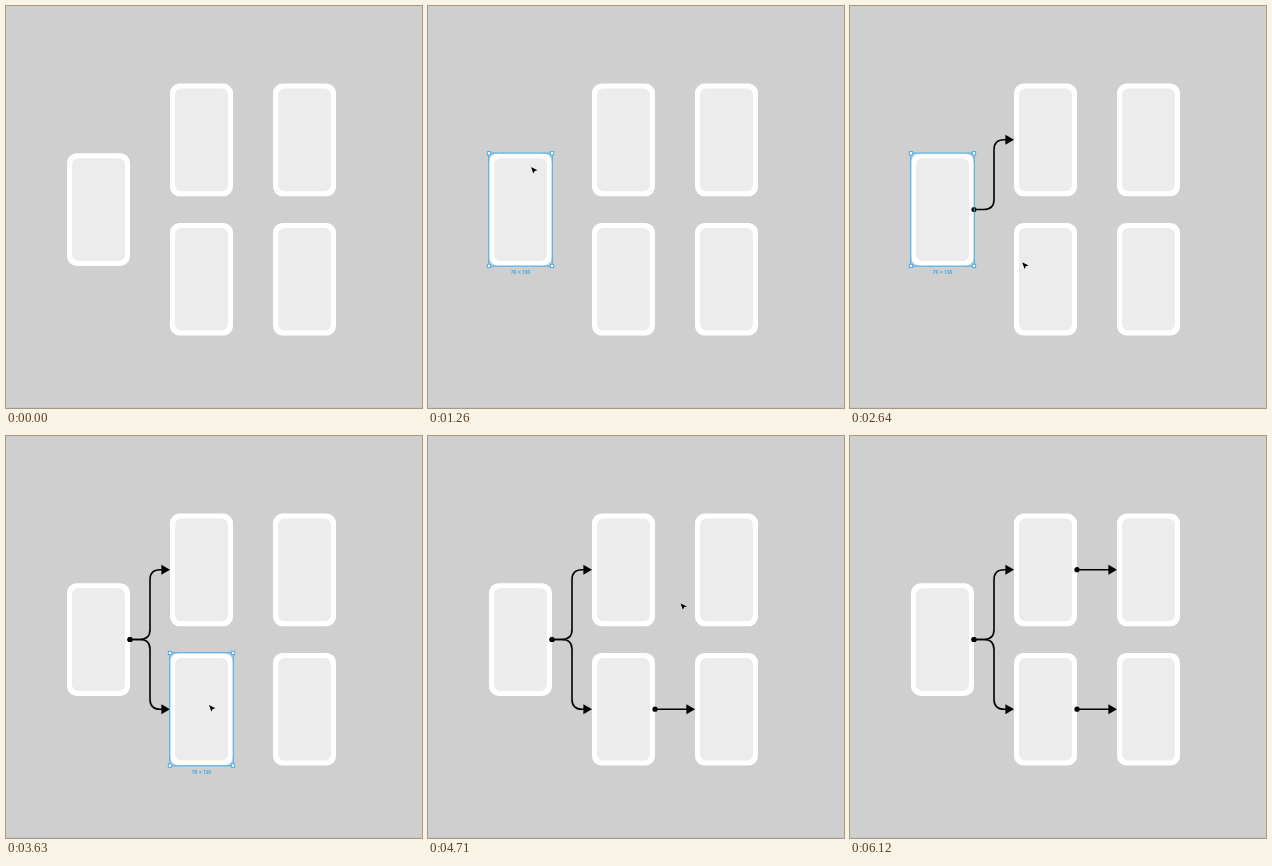
Recreate the animation shown at these times as an HTML page. Size 416 by 402 pixels, loop 7.17 s.

```html
<!DOCTYPE html>
<html lang="en">
<head>
<meta charset="utf-8">
<title>Flow arrows</title>
<style>
  html, body { margin: 0; width: 100%; height: 100%; overflow: hidden; background: #cfcfcf; }
  svg { display: block; width: 416px; height: 402px; }
  .link path { fill: none; stroke: #000; stroke-width: 1.6; }
  .hover { fill: none; stroke: #2b9fe8; stroke-width: 1.4; }
  .select rect { fill: none; stroke: #3aa8ee; stroke-width: 1; }
  .select .handle { fill: #fff; stroke-width: .9; }
  .select text { font: 500 4.8px Inter, Arial, sans-serif; fill: #1c9be6; text-anchor: middle; }
</style>
</head>
<body>
<svg viewBox="0 0 416 402">
  <rect width="416" height="402" fill="#cfcfcf"/>
  <rect y="401" width="416" height="1" fill="#c6c6c6"/>
  <g id="cards"></g>
  <g id="links"></g>
  <g id="marks"></g>
  <path id="cursor" d="M0 0L6.6 3.2L3.7 4L2.4 6.8Z" fill="#000" stroke="#fff" stroke-width=".8" paint-order="stroke"/>
</svg>
<script>
const LOOP = 7170, STEP = 30, W = 63, H = 112.6;
const $ = id => document.getElementById(id);

const cards = {
  start: [61, 147.3],
  top: [164, 77.6],
  topRight: [267, 77.6],
  bottom: [164, 217],
  bottomRight: [267, 217]
};

// Time spans in ms during which each card is outlined or selected
const hovers = {
  start: [[630, 1020], [1980, 2130]],
  top: [[390, 510], [1410, 1620], [4830, 5010]],
  topRight: [[5310, 5730], [6000, 6060]],
  bottom: [[2670, 2910], [3390, 3630]],
  bottomRight: [[4050, 4320], [4620, 4650]]
};
const selections = {
  start: [[1020, 1620], [2130, 2910]],
  top: [[5010, 5730]],
  bottom: [[3630, 4320]]
};

// Cursor moves: start, end, x, y
const origin = [313, 208];
const moves = [
  [240, 810, 103, 161],
  [1260, 1530, 181, 134],
  [1860, 2070, 105, 190],
  [2370, 2790, 182, 266],
  [3360, 3510, 203, 269],
  [3870, 4230, 292, 236],
  [4590, 4980, 216, 104],
  [5220, 5460, 297, 125],
  [5970, 6120, 459, 135]
];

const links = [
  [1620, 124, 203.5, 'H134Q144 203.5 144 193.5V143.7Q144 133.7 154 133.7H157', 164, 133.7],
  [2910, 124, 203.5, 'H134Q144 203.5 144 213.5V263.2Q144 273.2 154 273.2H157', 164, 273.2],
  [4320, 227, 273.2, 'H260', 267, 273.2],
  [5730, 227, 133.7, 'H260', 267, 133.7]
];

const timed = [];

function add(parent, markup, spans, cls) {
  const g = document.createElementNS('http://www.w3.org/2000/svg', 'g');
  g.innerHTML = markup;
  if (cls) g.setAttribute('class', cls);
  $(parent).append(g);
  if (spans) timed.push({ g, spans });
}

const box = (x, y, w, h, extra = '') =>
  `<rect x="${x}" y="${y}" width="${w}" height="${h}" ${extra}/>`;

for (const [x, y] of Object.values(cards)) {
  add('cards', box(x, y, W, H, 'rx="9.5" fill="#fff"') +
    box(x + 5, y + 5, W - 10, H - 10, 'rx="6.5" fill="#ececec"'));
}

for (const [time, x, y, route, tipX, tipY] of links) {
  add('links', `<circle cx="${x}" cy="${y}" r="2.6"/><path d="M${x} ${y}${route}"/>` +
    `<polygon points="${tipX},${tipY} ${tipX - 8.6},${tipY - 5} ${tipX - 8.6},${tipY + 5}"/>`,
    [[time, LOOP]], 'link');
}

for (const [name, spans] of Object.entries(hovers)) {
  const [x, y] = cards[name];
  add('marks', box(x - .3, y - .3, W + .6, H + .6), spans, 'hover');
}

for (const [name, spans] of Object.entries(selections)) {
  const [x, y] = cards[name];
  let markup = box(x - .2, y - .2, W + .4, H + .4);
  for (const cx of [x, x + W])
    for (const cy of [y, y + H])
      markup += box(cx - 1.7, cy - 1.7, 3.4, 3.4, 'class="handle"');
  markup += `<text x="${x + W / 2}" y="${y + H + 8}">76 × 136</text>`;
  add('marks', markup, spans, 'select');
}

function cursorAt(t) {
  let [x, y] = origin;
  for (const [from, to, nx, ny] of moves) {
    if (t < from) break;
    const p = Math.min(1, (t - from) / (to - from));
    const leaving = nx > 416;
    const k = leaving ? p * p : 1 - (1 - p) ** 2;
    x += (nx - x) * k;
    y += (ny - y) * k;
  }
  return [x, y];
}

function draw(now) {
  const t = Math.floor((now % LOOP) / STEP) * STEP;
  for (const { g, spans } of timed) {
    const on = spans.some(([from, to]) => t >= from && t < to);
    g.style.display = on ? '' : 'none';
  }
  const [x, y] = cursorAt(t);
  $('cursor').style.display = t >= 270 && t < 6120 ? '' : 'none';
  $('cursor').setAttribute('transform', `translate(${x} ${y})`);
}

const begin = performance.now();
function tick() {
  draw(performance.now() - begin);
  requestAnimationFrame(tick);
}
tick();
</script>
</body>
</html>
```
